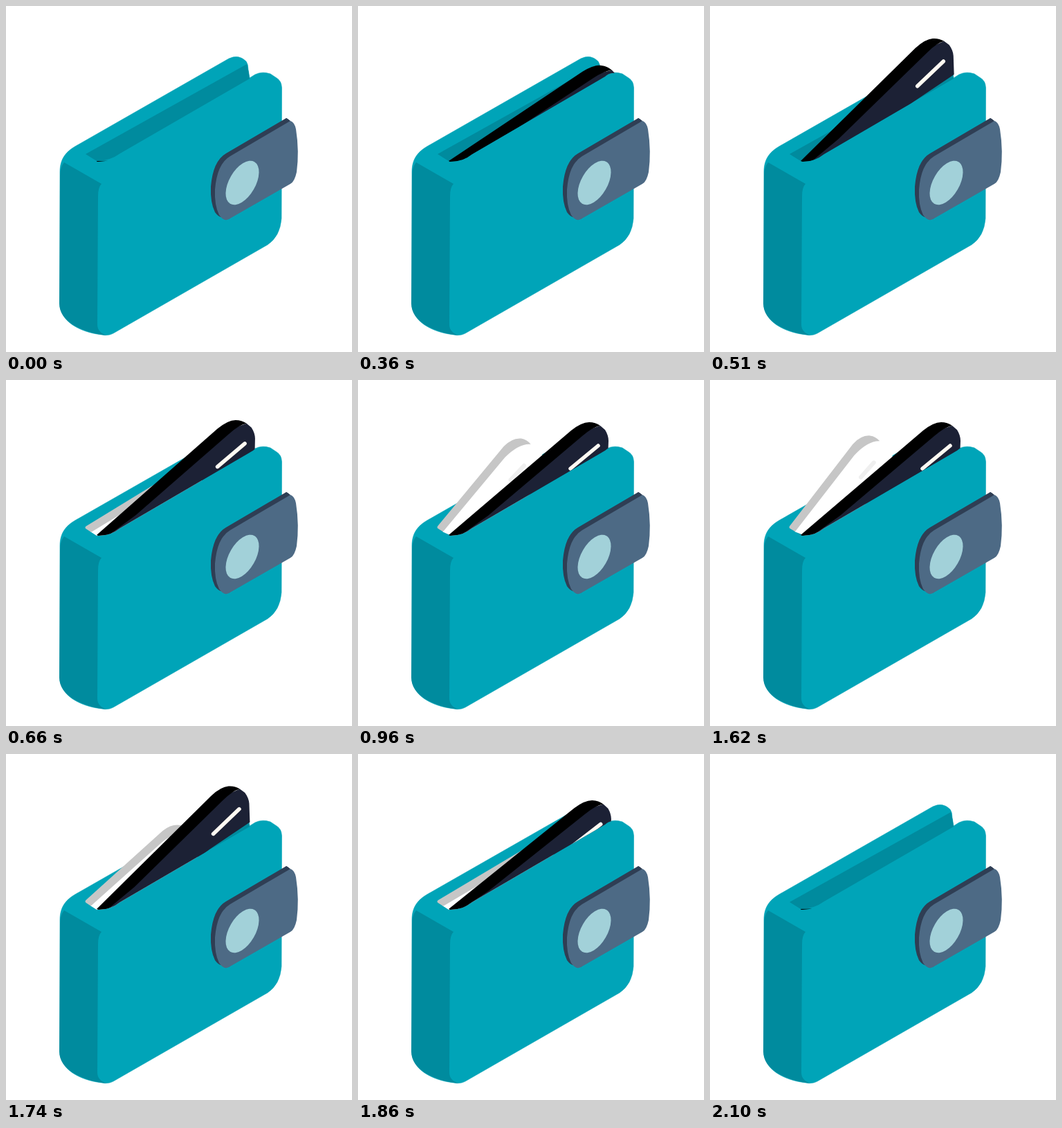
Animation, 500 px wide and 500 px high, one loop 2.13 s. Source, as an HTML page:

```html
<!DOCTYPE html>
<html lang="en">
<head>
<meta charset="utf-8">
<title>Wallet</title>
<style>
  html, body { margin: 0; width: 100%; height: 100%; overflow: hidden; background: #fff; }
  svg { display: block; width: 100%; height: 100%; }
</style>
</head>
<body>
<svg viewBox="0 0 500 500">
  <clipPath id="opening">
    <path d="M0 0H500V97H367Q361 98 357 102L165 214Q150 226 131 225L114 214L0 213Z"/>
  </clipPath>

  <!-- wallet body -->
  <path fill="#00a4b8" stroke="#00a4b8" stroke-width=".6" d="M78 240C78 219 88 209 105 200L322 76Q336 69 347 80Q350 84 350 92L352 104L360 99Q370 94 382 98L391 104Q398 108 398.500 118L398 307Q396 333 378 345L155 473Q148 477 138 475C105 471 78 455 78 430Z"/>
  <path fill="#008b9e" d="M84 226L138 257Q133 262 133 275L132 460Q132 472 146 476C108 472 77 455 77 430L78 245Q78 233 84 226Z"/>
  <path fill="#008b9e" d="M115 214L348 84Q351 95 352 105L165 213Q150 224 131 224Z"/>

  <g clip-path="url(#opening)">
    <g id="white">
      <path fill="#fff" d="M122 219L214 100Q230 89 247 90L258 96Q265 102 265 112L262 150L160 235Z"/>
      <path fill="#c6c6c6" d="M116 210L208 94Q220 81 233 82Q241 83 247 90Q230 89 210 110L123 219L116 215Q113 213 116 210Z"/>
      <path stroke="#efefef" stroke-width="6" stroke-linecap="round" d="M219 142L238 121"/>
    </g>
    <g id="black">
      <path fill="#1c2135" d="M140 228L316 78L350 66L357 72Q362 80 362 88L361 115L300 150L170 235Z"/>
      <path d="M131 224L308 73Q323 61 334 61Q343 61 350 66Q339 68 324 81L188 196L142 229Z"/>
      <path stroke="#fffaf2" stroke-width="5.500" stroke-linecap="round" d="M307 128L347 95"/>
    </g>
  </g>

  <!-- clasp: the same flap twice, the darker one behind -->
  <defs>
    <path id="flap" d="M324 217L411 166Q417 168 419 178Q424 210 420 240Q417 254 411 257L322 308Q315 312 308 302Q301 288 302 265Q305 228 324 217Z"/>
  </defs>
  <g fill="#2f3e54">
    <use href="#flap" x="-6" y="-4"/>
    <path d="M405 162L411 166L322 308L312 306Z"/>
  </g>
  <use href="#flap" fill="#4d6a85"/>
  <ellipse fill="#a2d1d9" cx="341.500" cy="255.500" rx="35" ry="19" transform="rotate(-60 341.500 255.500)"/>
</svg>
<script>
  const LOOP = 2130;

  // Angles in degrees above the horizontal; each card is drawn at its open angle.
  // rise: start, peak, settled; fall: start, peak, closed (ms)
  const cards = [
    { id: 'white', pivot: '115 213', closed: 29, open: 52, over: 2,
      rise: [540, 1090, 1200], fall: [1490, 1570, 1930] },
    { id: 'black', pivot: '131 224', closed: 0, open: 39.7, over: 4.6,
      rise: [-10, 550, 705], fall: [1620, 1770, LOOP + 10] }
  ];

  function ramp(t, from, to) {
    const x = Math.min(1, Math.max(0, (t - from) / (to - from)));
    return (1 - Math.cos(Math.PI * x)) / 2;
  }

  // Swing past the open angle, settle, swing past it again, then close.
  function angleAt({ closed, open, over, rise, fall }, t) {
    const swing = ramp(t, rise[0], rise[1]) - ramp(t, fall[1], fall[2]);
    const settle = ramp(t, rise[1], rise[2]) - ramp(t, fall[0], fall[1]);
    return closed + (open + over - closed) * swing - over * settle;
  }

  function draw() {
    const t = performance.now() % LOOP;
    for (const card of cards) {
      const angle = angleAt(card, t);
      const node = document.getElementById(card.id);
      node.setAttribute('transform', `rotate(${card.open - angle} ${card.pivot})`);
      node.style.display = angle > card.closed ? '' : 'none';
    }
    requestAnimationFrame(draw);
  }
  draw();
</script>
</body>
</html>
```
